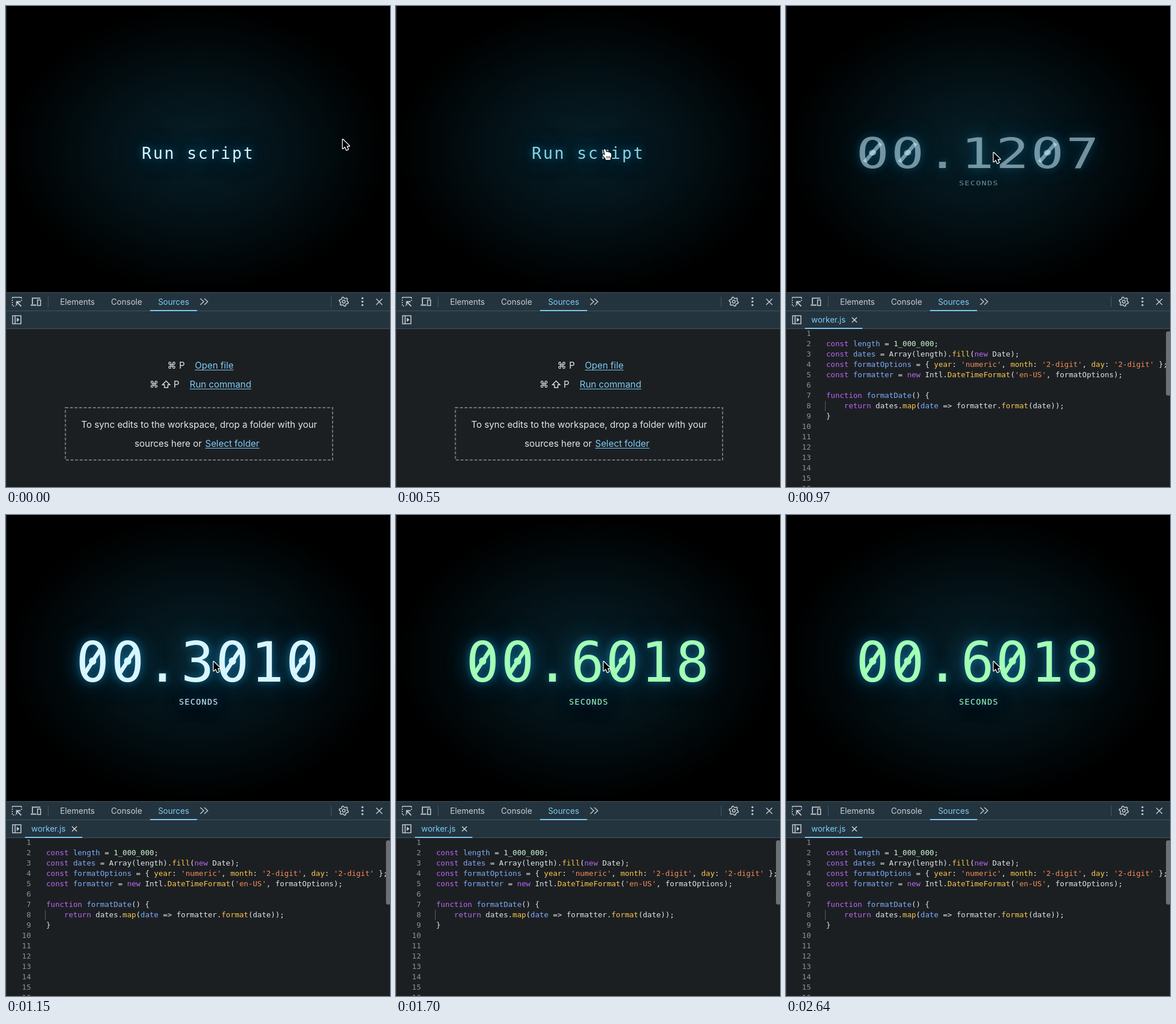
An HTML page with a canvas for the animation above (2670 ms loop, 669 by 837 pixels).

```html
<!DOCTYPE html>
<html lang="en">
<head>
<meta charset="utf-8">
<title>Run script</title>
<style>
  html, body { margin: 0; height: 100%; overflow: hidden; background: #000; }
  canvas { display: block; }
</style>
</head>
<body>
<canvas id="stage" width="669" height="837"></canvas>
<script>
const ctx = document.getElementById('stage').getContext('2d');
const LOOP = 2670, CLICK = 640, START = 849, END = 1460;
const MONO = '"DejaVu Sans Mono", monospace';
const SANS = 'Inter, "DejaVu Sans", sans-serif';
const ICE = '#d8f6ff', GREEN = '#a2ffb4', SKY = '#7ccdf7', ICON = '#c3c9cd', PALE = '#e3e5e7';

const SOURCE = `
const length = 1_000_000;
const dates = Array(length).fill(new Date);
const formatOptions = { year: 'numeric', month: '2-digit', day: '2-digit' };
const formatter = new Intl.DateTimeFormat('en-US', formatOptions);

function formatDate() {
    return dates.map(date => formatter.format(date));
}`.split('\n');
// Groups: keyword, string, number, member or key, definition
const TOKEN = /(\b(?:const|new|function|return)\b)|('[^']*')|(\d[\d_]+)|((?<=\.)\w+|\w+(?=:))|((?<=const |function )\w+|\w+(?= =>))|\w+|./g;
const TOKEN_COLORS = ['#b968f7', '#f58d56', '#c9f7d2', '#fcc84c', '#7eaefb'];

const clamp = v => Math.min(1, Math.max(0, v));
const smooth = v => v * v * (3 - 2 * v);
const mix = (a, b, p) => a + (b - a) * p;

function rect(color, x, y, w, h) {
  ctx.fillStyle = color;
  ctx.fillRect(x, y, w, h);
}

function text(str, x, y, font, color, align = 'left', spacing = 0) {
  ctx.font = font;
  ctx.fillStyle = color;
  ctx.textAlign = align;
  ctx.letterSpacing = spacing + 'px';
  ctx.fillText(str, x, y);
}

function stroke(d, color = ICON, width = 1.5) {
  ctx.strokeStyle = color;
  ctx.lineWidth = width;
  ctx.stroke(new Path2D(d));
}

function fill(d, color = ICON) {
  ctx.fillStyle = color;
  ctx.fill(new Path2D(d));
}

function link(str, x, y) {
  text(str, x, y, '15.8px ' + SANS, SKY);
  rect(SKY, x, y + 2, ctx.measureText(str).width, 1);
}

// Casts only the blurred shadow of whatever paint() draws
function glow(paint, blur, alpha) {
  ctx.save();
  ctx.shadowColor = `rgba(28,140,195,${alpha})`;
  ctx.shadowBlur = blur;
  ctx.shadowOffsetX = 2000;
  ctx.translate(-2000, 0);
  paint();
  ctx.restore();
}

function glowing(paint, alpha, scaleY, originY) {
  ctx.save();
  ctx.globalAlpha = alpha;
  ctx.translate(0, originY);
  ctx.scale(1, scaleY);
  ctx.translate(0, -originY);
  glow(paint, 40, 0.6);
  glow(paint, 14, 0.6);
  paint();
  ctx.restore();
}

function drawBackdrop() {
  rect('#000', 0, 0, 669, 837);
  ctx.save();
  ctx.translate(334.5, 249);
  ctx.scale(1, 249 / 334.5);
  const shade = ctx.createRadialGradient(0, 0, 0, 0, 0, 331);
  shade.addColorStop(0, '#071f28');
  shade.addColorStop(0.5, '#031116');
  shade.addColorStop(1, '#000');
  rect(shade, -334.5, -334.5, 669, 669);
  ctx.restore();
}

function drawButton(t, hover) {
  const out = clamp((t - CLICK) / 200);
  if (out === 1) return;
  const h = hover ? 1 : 0;
  const color = `rgb(${mix(216, 136, h)},${mix(246, 212, h)},${mix(255, 222, h)})`;
  glowing(() => text('Run script', 236.5, 266, '28px ' + MONO, color, 'left', 2.8), 1 - out, 1 + out, 255);
}

function drawTimer(t) {
  if (t < START) return;
  const done = t >= END, color = done ? GREEN : ICE;
  const seconds = done ? 0.6018 : Math.max(0, 0.1207 + (t - 970) * 0.4508 / 450);
  const digits = seconds.toFixed(4).padStart(7, '0');
  const shown = clamp((t - START) / 230);
  glowing(() => {
    text(digits, 122, 289.5, '96px ' + MONO, color, 'left', 3.1);
    [...digits].forEach((digit, i) => {
      const x = 151 + i * 60.9;
      if (digit === '0') stroke(`M${x - 14} 276L${x + 14} 233`, color, 7);
    });
    text('SECONDS', 301.5, 329.5, '14px ' + MONO, color, 'left', 1.4);
  }, shown, 0.5 + 0.5 * shown, 257);
}

function drawToolbar() {
  rect('#1c1f22', 0, 498, 669, 339);
  rect('#24343e', 0, 498, 669, 64);
  for (const y of [498, 530, 561]) rect('#43555f', 0, y, 669, 1);

  // Element picker
  ctx.setLineDash([2, 2]);
  stroke('M26 508V507H11V522H17M11 507H27V513', ICON, 1.7);
  ctx.setLineDash([]);
  stroke('M26.5 522.5L19 515M18.5 521V514.5H25.5', ICON, 1.8);
  // Device switch
  stroke('M60 508.3H46V519M43 520.5H53', ICON, 1.8);
  stroke('M55 511.5H60.3V521.3H55Z', ICON, 1.6);

  rect('#465862', 73, 506, 1, 18);
  rect('#465862', 566, 506, 1, 18);
  text('Elements', 124.5, 520, '14px ' + SANS, '#c9ced2', 'center');
  text('Console', 210, 520, '14px ' + SANS, '#c9ced2', 'center');
  text('Sources', 292, 520, '14px ' + SANS, SKY, 'center');
  rect(SKY, 251, 529, 82, 2);
  stroke('M338.5 509L344.5 514.5L338.5 520M345.5 509L351.5 514.5L345.5 520');

  // Gear
  let gear = '';
  for (let i = 0; i < 24; i++) {
    const a = (i + 0.5) * Math.PI / 12, r = i % 4 < 2 ? 8 : 6;
    gear += `${i ? 'L' : 'M'}${588.5 + r * Math.cos(a)} ${514.5 + r * Math.sin(a)}`;
  }
  stroke(gear + 'Z', ICON, 1.6);
  stroke('M586 514.5a2.5 2.5 0 1 0 5 0a2.5 2.5 0 1 0 -5 0');
  for (const y of [508.5, 514.5, 520.5]) fill(`M619.2 ${y}a1.8 1.8 0 1 0 3.6 0a1.8 1.8 0 1 0 -3.6 0`);
  stroke('M645 509.5L655.5 520M655.5 509.5L645 520');

  // Sidebar toggle
  stroke('M11.5 539H26V553H11.5ZM15.8 539V553', ICON, 1.6);
  fill('M18.8 542.3V549.7L23.5 546Z');
}

function drawWelcome() {
  const font = '15.8px ' + SANS;
  text('⌘', 281, 631, font, PALE);
  text('P', 301.5, 631, font, PALE);
  link('Open file', 329, 631);
  text('⌘', 250, 664, font, PALE);
  stroke('M279 652.5L285.5 659H282V664H276V659H272.5Z', PALE, 1.4);
  text('P', 292, 664, font, PALE);
  link('Run command', 320, 664);
  ctx.setLineDash([5, 3]);
  stroke('M103.5 699H569V790H103.5Z', '#74787b', 2);
  ctx.setLineDash([]);
  text('To sync edits to the workspace, drop a folder with your', 336.5, 734, font, PALE, 'center');
  text('sources here or', 224, 767, font, PALE);
  link('Select folder', 347, 767);
}

function drawEditor() {
  text('worker.js', 44, 551, '14px ' + SANS, SKY);
  stroke('M115 542L123.5 550.5M123.5 542L115 550.5', '#d3d7da');
  rect(SKY, 33, 560, 100, 2);

  ctx.save();
  ctx.beginPath();
  ctx.rect(0, 562, 669, 275);
  ctx.clip();
  const font = '13px ' + MONO;
  for (let n = 0; n < 16; n++) {
    const y = 574 + n * 18;
    text(n + 1, 43.5, y, font, '#8b9195', 'right');
    const advance = ctx.measureText('0').width;
    for (const m of (SOURCE[n] || '').matchAll(TOKEN)) {
      const kind = m.slice(1).findIndex(Boolean);
      text(m[0], 70 + m.index * advance, y, font, TOKEN_COLORS[kind] || PALE);
    }
  }
  rect('#5a5e61', 68, 687, 1, 18);
  ctx.fillStyle = '#6d7072';
  ctx.beginPath();
  ctx.roundRect(662, 566, 8, 112, 4);
  ctx.fill();
  ctx.restore();
}

function drawCursor(x, y, hand) {
  ctx.save();
  ctx.translate(x, y);
  ctx.lineJoin = 'round';
  if (hand) {
    const shape = 'M-2 -3Q-1.5 -6 .8 -4L2.5 .5Q4 -1 5.5 .8Q7.5 -.2 8.5 1.8Q11 1.5 11 4.5V8L9.5 11V14H1V12L-4 6Q-4.5 3.5 -2 4.5L0 6Z';
    stroke(shape, '#000', 2.4);
    fill(shape, '#fff');
    stroke('M3 7.5V11.5M5.5 7.5V11.5M8 7.5V11.5', '#000', 0.9);
  } else {
    const shape = 'M.7 1.2V17L4.5 13.6L7.1 19.6L10 18.3L7.4 12.6H12.2Z';
    stroke(shape, '#fff', 2.6);
    fill(shape, '#000');
  }
  ctx.restore();
}

function draw(t) {
  const move = smooth(clamp((t - 10) / 580));
  const x = mix(586, 361, move), y = mix(231, 254, move);
  const hover = x < 455;
  drawBackdrop();
  drawButton(t, hover);
  drawTimer(t);
  drawToolbar();
  if (t < START) drawWelcome(); else drawEditor();
  rect('#34383a', 0, 0, 1, 837);
  drawCursor(x, y, hover && t < CLICK);
}

// The picture is held for 30 ms at a time
function tick() {
  const t = performance.now() % LOOP;
  draw(Math.max(0, t >= END ? t : Math.min(1420, Math.floor((t - 10) / 30) * 30 + 10)));
  requestAnimationFrame(tick);
}
tick();
</script>
</body>
</html>
```
